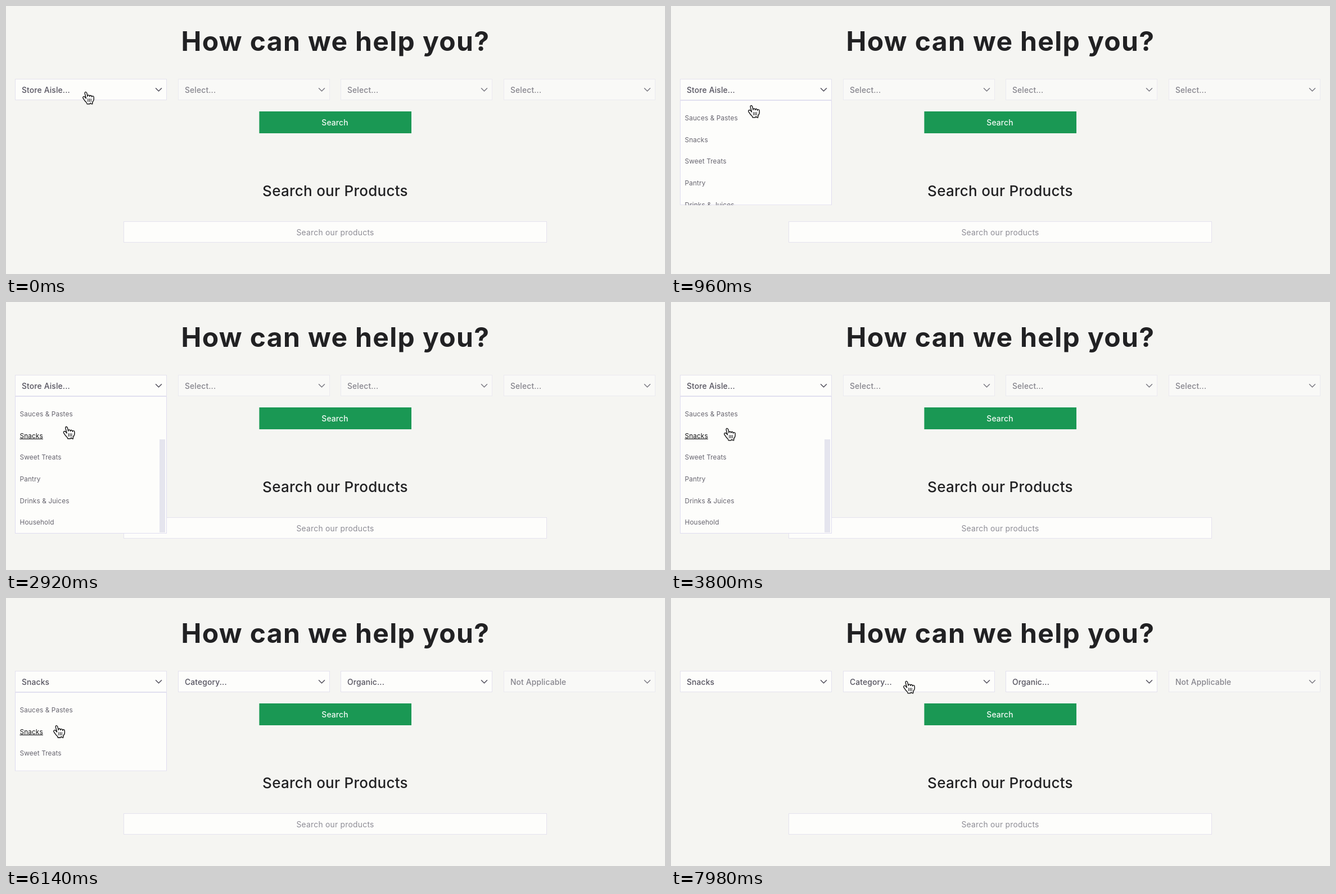
Write an HTML page that moves like this. It is 1172 px wide and 478 px high and loops after 8000 ms.

```html
<!DOCTYPE html>
<html lang="en">
<head>
<meta charset="utf-8">
<title>Product finder</title>
<style>
  html, body { margin: 0; width: 100%; height: 100%; overflow: hidden; background: #f5f5f2; }
  svg { display: block; }
  #stage { width: 100%; height: 100%; }
  text {
    font-family: Inter, "Open Sans", sans-serif;
    font-optical-sizing: none;
    font-size: 13.8px;
    font-weight: 500;
    letter-spacing: .012em;
    fill: #55535f;
  }
  .middle { text-anchor: middle; }
  .title { font-size: 48px; font-weight: 700; letter-spacing: .028em; fill: #212123; }
  .subtitle { font-size: 26px; letter-spacing: .01em; fill: #212123; }
  .button { fill: #f4fbf6; }
  .hint { font-weight: 400; letter-spacing: .02em; fill: #8d8c95; }
  .item { font-size: 11.8px; font-weight: 400; letter-spacing: .01em; fill: #67656f; }
  .item.hover { fill: #141416; text-decoration: underline; text-underline-offset: 2px; }
  .box { fill: #fdfdfb; stroke: #e4e2ee; }
  .panel { fill: #fdfdfb; stroke: #dfddf0; }
  .chevron { fill: none; stroke: #55535f; stroke-width: 1.6; stroke-linecap: round; stroke-linejoin: round; }
  .off .box { fill: #f9f9f7; stroke: #ebeaf0; }
  .off text { fill: #85848c; }
  .off .chevron { stroke: #7e7d86; }
</style>
</head>
<body>
<svg id="stage" viewBox="0 0 1172 478"></svg>
<script>
const LOOP = 8000;
const OPEN = 690, PICK = 5960, SLIDE = 400;
const LIST_HEIGHT = 245, ROW = 38.65;
const ITEMS = ["Sauces & Pastes", "Snacks", "Sweet Treats", "Pantry", "Drinks & Juices", "Household"];
const BEFORE = ["Store Aisle...", "Select...", "Select...", "Select..."];
const AFTER = ["Snacks", "Category...", "Organic...", "Not Applicable"];

// Pointer tip: time, x, y
const PATH = [
  [0, 142, 153], [720, 142, 154], [960, 143, 177], [1300, 138, 200],
  [1940, 121, 214], [2700, 110, 221], [3800, 100, 225], [5440, 89, 228],
  [6100, 88, 228], [6600, 245, 170], [6950, 347, 145], [7500, 409, 147], [8000, 419, 148]
];

const stage = document.getElementById("stage");

function add(parent, tag, attrs, content) {
  const el = document.createElementNS("http://www.w3.org/2000/svg", tag);
  for (const key in attrs) el.setAttribute(key, attrs[key]);
  if (content) el.textContent = content;
  parent.appendChild(el);
  return el;
}

const label = (parent, x, y, cls, content) => add(parent, "text", { x, y, class: cls }, content);
const rect = (parent, x, y, width, height, attrs) => add(parent, "rect", { x, y, width, height, ...attrs });

label(stage, 586, 80, "middle title", "How can we help you?");

const selects = BEFORE.map((name, i) => {
  const x = 16 + Math.round(i * 289.7);
  const group = add(stage, "g", {});
  rect(group, x + .5, 130.5, 269, 37, { class: "box" });
  const text = label(group, x + 12, 155, "", name);
  add(group, "path", { d: `M${x + 250.5} 146.8l5 5l5 -5`, class: "chevron" });
  return { group, text };
});

rect(stage, 450.4, 188, 270.6, 39, { fill: "#1a9854" });
label(stage, 585, 213, "middle button", "Search");
label(stage, 585.5, 339, "middle subtitle", "Search our Products");
rect(stage, 209.5, 384.5, 752, 37, { class: "box" });
label(stage, 585.5, 409, "middle hint", "Search our products");

const list = add(stage, "svg", { x: 16, y: 168, width: 270, height: 0, overflow: "hidden" });
const panel = rect(list, .5, .5, 269, 0, { class: "panel" });
const items = ITEMS.map((name, i) => label(list, 8.5, 36 + i * ROW, "item", name));
const thumb = rect(list, 257, 77, 10, 166, { fill: "#e5e5ee" });

const HAND = "M11.3 20.4L8.6 16.5C8 15.1 9.5 13.6 11.2 15.1L12.8 17L11.1 10.6" +
  "C10.5 8.2 13 7.7 13.7 10L14.7 14.4C14.4 12 17.2 11.8 17.4 14.5C17.5 12.4 20 12.4 20.2 15" +
  "C20.5 13.4 22.8 13.3 22.9 15.4V18C22.8 20.4 21.2 20.8 21 22.2V24.1" +
  "C20 24.5 19.3 24.2 18.6 23L17.4 24.2H13.9C14.2 22.5 12.3 21.5 11.3 20.4Z";
const pointer = add(stage, "g", { "stroke-linejoin": "round", "stroke-linecap": "round" });
add(pointer, "path", { d: HAND, transform: "translate(.3 .9)", fill: "#000", stroke: "#000", opacity: .18 });
add(pointer, "path", { d: HAND, fill: "#fff", stroke: "#111" });
add(pointer, "path", { d: "M15.2 17.4v3.7M17.2 17.4v3.7M19.2 17.4v3.7", fill: "none", stroke: "#111", "stroke-width": .8 });

const clamp = v => Math.min(1, Math.max(0, v));
const swing = p => .5 - Math.cos(clamp(p) * Math.PI) / 2;

// Smooth curve through the path without overshoot
function track(t, axis) {
  const slope = k => k < 0 || k > PATH.length - 2 ? 0 :
    (PATH[k + 1][axis] - PATH[k][axis]) / (PATH[k + 1][0] - PATH[k][0]);
  const tangent = k => {
    const a = slope(k - 1), b = slope(k);
    return a * b > 0 ? 2 * a * b / (a + b) : 0;
  };
  let i = 0;
  while (i < PATH.length - 2 && t >= PATH[i + 1][0]) i++;
  const from = PATH[i], to = PATH[i + 1];
  const span = to[0] - from[0], u = (t - from[0]) / span, v = 1 - u;
  return v * v * (1 + 2 * u) * from[axis] + u * u * (3 - 2 * u) * to[axis]
    + span * u * v * (v * tangent(i) - u * tangent(i + 1));
}

function draw(t) {
  const x = track(t, 1), y = track(t, 2);
  const picked = t >= PICK;

  selects.forEach(({ group, text }, i) => {
    text.textContent = (picked ? AFTER : BEFORE)[i];
    group.setAttribute("class", i === 3 || (i > 0 && !picked) ? "off" : "");
  });

  const height = LIST_HEIGHT * (swing((t - OPEN) / SLIDE) - swing((t - PICK) / SLIDE));
  list.setAttribute("visibility", height > 1 ? "visible" : "hidden");
  list.setAttribute("height", Math.max(0, height));
  panel.setAttribute("height", Math.max(0, height - 1));
  thumb.setAttribute("opacity", t >= OPEN + SLIDE && !picked ? 1 : 0);

  const row = x < 286 && y > 180.5 ? Math.floor((y - 180.5) / ROW) : -1;
  items.forEach((item, i) => item.setAttribute("class", i === row ? "item hover" : "item"));

  pointer.setAttribute("transform", `translate(${x} ${y}) scale(1.35) translate(-12.4 -8.2)`);
}

function tick() {
  draw(performance.now() % LOOP);
  requestAnimationFrame(tick);
}
tick();
</script>
</body>
</html>
```
